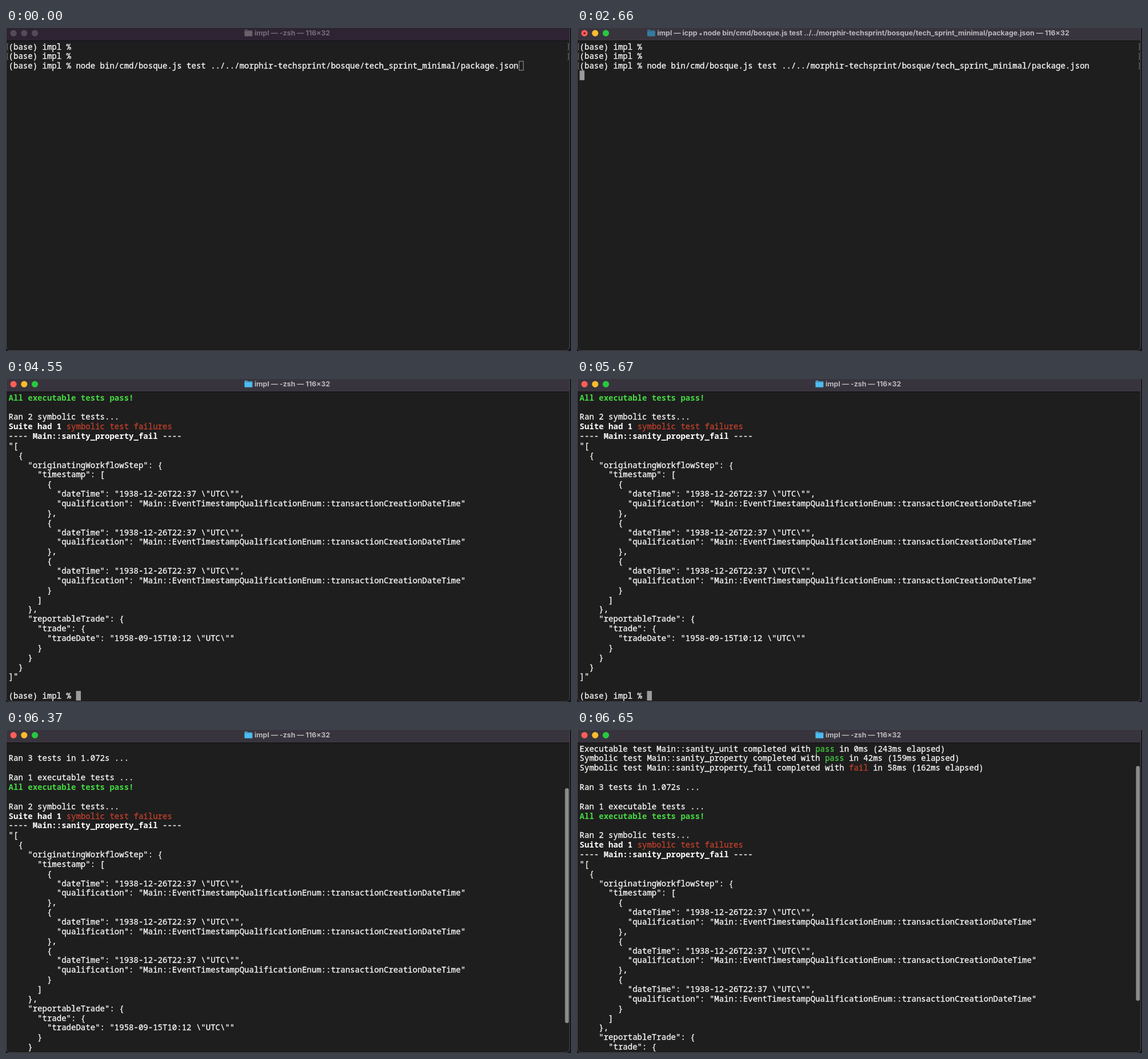
Recreate the animation shown at these times as an HTML page. Size 989 px wide and 566 px high, loop 8 s.

```html
<!DOCTYPE html>
<html lang="en">
<head>
<meta charset="utf-8">
<title>Terminal</title>
<style>
  html, body { margin: 0; width: 100%; height: 100%; overflow: hidden; background: #0d0b14; }
  svg { display: block; width: 989px; height: 566px; }
  .row { font: 500 14.04px "Noto Sans Mono", "DejaVu Sans Mono", monospace; fill: #fafafa; stroke: #fafafa; stroke-width: .3; white-space: pre; }
  .b { font-weight: 700; fill: #fff; stroke: none; }
  .g { fill: #46cf43; stroke: #46cf43; }
  .b.g { fill: #46d943; stroke: none; }
  .r { fill: #c3402c; stroke: #c3402c; }
  #title { font: 700 12.35px Inter, "Liberation Sans", sans-serif; white-space: pre; }
  .arrow { font: 9px "DejaVu Sans", sans-serif; }
  .marks { fill: none; stroke: #777; stroke-width: 1; }
</style>
</head>
<body>
<svg viewBox="0 0 989 566">
  <rect width="989" height="566" fill="#17131f"/>
  <path d="M0 0H987V558Q987 566 979 566H8Q0 566 0 558Z" fill="#1e1e1e"/>
  <path id="bar" d="M0 0H987V22H0Z"/>
  <path d="M0 22.5H987" stroke="#0d0c0f"/>
  <path d="M.5 0V557Q.5 565.5 9 565.5H978Q986.5 565.5 986.5 557V0" fill="none" stroke="#4b494e"/>
  <g id="lights"></g>
  <circle id="dot" cx="13.1" cy="9.1" r="1.9" fill="#7c1511"/>
  <g id="folder">
    <path d="M0 1.2Q0 0 1.2 0H4.4L6 1.5H12.6Q13.8 1.5 13.8 2.7V6H0Z" opacity=".75"/>
    <path d="M0 3.4H13.8V10.8Q13.8 12 12.6 12H1.2Q0 12 0 10.8Z"/>
  </g>
  <text id="title" y="13.2"></text>
  <rect id="cursor"/>
  <g id="screen"></g>
  <rect id="thumb" x="978.5" width="6.6" height="411.5" rx="3.3" fill="#8b8b8b"/>
</svg>
<script>
const LOOP = 8000, TOP = 24.3, LINE = 16.86, CELL = 8.425, LEFT = 4.6, ROWS = 32;
const $ = id => document.getElementById(id);
const span = (cls, s) => `<tspan class="${cls}">${s}</tspan>`;

const prompt = '(base) impl % ';
const args = 'node bin/cmd/bosque.js test ../../morphir-techsprint/bosque/tech_sprint_minimal/package.json';
const stamp = end => [
  '        {',
  '          "dateTime": "1938-12-26T22:37 \\"UTC\\"",',
  '          "qualification": "Main::EventTimestampQualificationEnum::transactionCreationDateTime"',
  '        }' + end
];
const result = (kind, name, state, ms, total) =>
  `${kind} test Main::${name} completed with ${span(state === 'pass' ? 'g' : 'r', state)} in ${ms}ms (${total}ms elapsed)`;

const shell = [prompt, prompt, prompt + args];
const output = [
  result('Executable', 'sanity_unit', 'pass', 0, 243),
  result('Symbolic', 'sanity_property', 'pass', 42, 159),
  result('Symbolic', 'sanity_property_fail', 'fail', 58, 162),
  '',
  'Ran 3 tests in 1.072s ...',
  '',
  'Ran 1 executable tests ...',
  span('b g', 'All executable tests pass!'),
  '',
  'Ran 2 symbolic tests...',
  span('b', 'Suite had 1 ') + span('r', 'symbolic test failures'),
  '---- ' + span('b', 'Main::sanity_property_fail') + ' ----',
  '"[',
  '  {',
  '    "originatingWorkflowStep": {',
  '      "timestamp": [',
  ...stamp(','), ...stamp(','), ...stamp(''),
  '      ]',
  '    },',
  '    "reportableTrade": {',
  '      "trade": {',
  '        "tradeDate": "1958-09-15T10:12 \\"UTC\\""',
  '      }',
  '    }',
  '  }',
  ']"',
  '',
  prompt
];
const BOTTOM = output.length - ROWS;

// title text, folder x, text x
const idle = ['impl — -zsh — 116×32', 417.5, 435];
const running = (job, x) => [`impl — ${job}${args} — 116×32`, x, x + 17.5];
const child = name => `${name} ${span('arrow', '◂')} `;
const node = running('', 143), icpp = running(child('icpp'), 123), chk = running(child('chk'), 125);
const titles = [[0, idle], [2240, node], [2660, icpp], [2870, node], [3290, chk], [3500, idle]];
const scrolls = [6160, 6230, 6300, 6370, 6440, 6580, 6650];

const set = (el, attrs) => { for (const k in attrs) el.setAttribute(k, attrs[k]); };
const rowTop = i => TOP + i * LINE;

function rowsSvg(lines, marked) {
  return lines.map((s, i) => {
    const y = rowTop(i), a = y + 3, b = y + 14;
    const marks = i < marked
      ? `<path class="marks" d="M4 ${a}H2.5V${b}H4M983 ${a}H984.5V${b}H983"/>` : '';
    return `${marks}<text class="row" x="${LEFT}" y="${y + 13.2}">${s}</text>`;
  }).join('');
}

function drawCursor(col, row, hollow) {
  const inset = hollow ? 0.5 : 0;
  set($('cursor'), {
    x: LEFT + col * CELL + inset, y: rowTop(row) - 0.3 + inset,
    width: 8.5 - 2 * inset, height: 16.8 - 2 * inset,
    fill: hollow ? 'none' : '#9b9b9b', stroke: hollow ? '#9b9b9b' : 'none'
  });
}

function drawBar(t, active) {
  const [text, folderX, textX] = titles.filter(e => t >= e[0]).pop()[1];
  const busy = t >= 2240 && t < 3500;
  const lights = active ? ['#fe5f57', '#febb2e', '#28c840'] : Array(3).fill('#544b58');
  set($('bar'), { fill: active ? '#38343d' : '#2d2333' });
  $('lights').innerHTML = lights.map((c, i) =>
    `<circle cx="${13.1 + i * 18.7}" cy="9.1" r="5.6" fill="${c}"/>`).join('');
  set($('dot'), { visibility: busy ? 'visible' : 'hidden' });
  set($('folder'), {
    transform: `translate(${folderX} 2.6)`,
    fill: !active ? '#69626d' : busy ? '#367a9e' : '#4dbcf0'
  });
  set($('title'), { x: textX, fill: active ? '#bab7bd' : '#756d79' });
  $('title').innerHTML = text;
}

let last = '';
function draw(t) {
  drawBar(t, t >= 910);
  const offset = scrolls.filter(s => t >= s).length;
  const start = BOTTOM - offset;
  let lines, marked = 0;
  if (t < 3430) {
    marked = t < 2100 ? 2 : 3;
    lines = t < 2870 ? shell : [...shell, output[0]];
    if (t < 2100) drawCursor(prompt.length + args.length, 2, t < 980);
    else drawCursor(0, lines.length, false);
  } else {
    lines = output.slice(start, start + ROWS);
    drawCursor(prompt.length, output.length - 1 - start, false);
  }
  const svg = rowsSvg(lines, marked);
  if (svg !== last) $('screen').innerHTML = last = svg;
  set($('thumb'), { y: 154 - offset * 13, visibility: t >= 6090 ? 'visible' : 'hidden' });
}

function tick(now) {
  draw(now % LOOP);
  requestAnimationFrame(tick);
}
draw(0);
requestAnimationFrame(tick);
</script>
</body>
</html>
```
